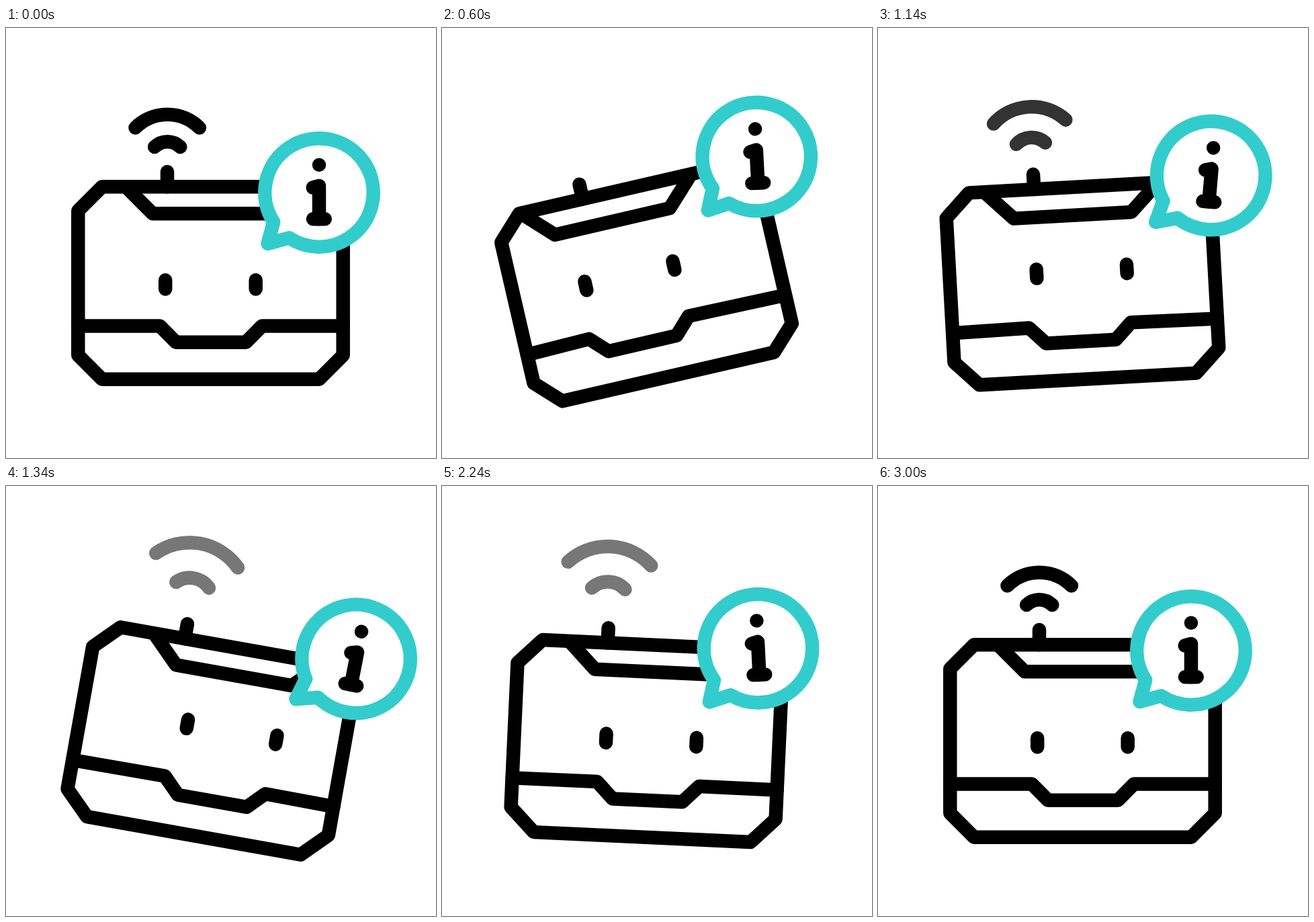
Write an HTML page with a canvas that moves like this. It is 640 by 640 pixels and loops after 3.02 s.

```html
<!DOCTYPE html>
<html lang="en">
<head>
<meta charset="utf-8">
<title>Device info</title>
<style>
  html, body { margin: 0; width: 100%; height: 100%; overflow: hidden; background: #fff; }
  canvas { display: block; width: 640px; height: 640px; }
</style>
</head>
<body>
<canvas id="stage" width="640" height="640"></canvas>
<script>
const ctx = document.getElementById('stage').getContext('2d');
const LOOP = 3020, STEP = 20;
const BEAT = 300, SWING = 3 * BEAT;
const TEAL = '#33cccc';
const RAD = Math.PI / 180;

const smooth = u => u * u * (3 - 2 * u);
const mix = (a, b, u) => a + (b - a) * u;

// Each swing moves for two beats and rests for one: rest, left, right, rest.
const swingEase = t => smooth(Math.min(1, t % SWING / (2 * BEAT)));

function swing(t, left, right) {
  const stops = [0, left, right, 0, 0];
  const n = Math.floor(t / SWING);
  return mix(stops[n], stops[n + 1], swingEase(t));
}

// Blends the values that a rule gives at the beats around t.
function onBeat(t, rule, ease) {
  const n = Math.floor(t / BEAT);
  return mix(rule(n), rule(n + 1), ease(t / BEAT - n));
}

const signalAlpha = n => n === 0 || n % 3 === 1 ? 1 : 0;
const bubbleTilt = n => n === 0 || n >= 8 ? 0 : n % 2 ? -10 : 10;

const shift = (pts, dx, dy) => pts.map(([x, y]) => [x + dx, y + dy]);
const mirror = pts => [...pts, ...pts.map(([x, y]) => [-x, y]).reverse()];

function line(pts, close = false) {
  ctx.beginPath();
  pts.forEach(p => ctx.lineTo(...p));
  if (close) ctx.closePath();
  ctx.stroke();
}

function drawSignal(t) {
  const k = t < 3 * SWING ? 1 + 0.36 * swingEase(t) : 1;
  const x = mix(-54.8, -64.3, k), y = mix(-130, -183.3, k);
  ctx.globalAlpha = onBeat(t, signalAlpha, u => u);
  for (const r of [67.5, 27]) {
    ctx.beginPath();
    ctx.arc(x, y, r * k, -135 * RAD, -45 * RAD);
    ctx.stroke();
  }
  ctx.globalAlpha = 1;
}

function drawBox(t) {
  const w = 197.2, h = 143.2, cut = 35.7;
  line(mirror([[cut - w, h], [-w, h - cut], [-w, cut - h], [cut - w, -h]]), true);
  line([[-64.5, -h], [-64.5, -165.5]]);

  const flap = mirror([[-127.4, -143], [-87.6, -103.2]]);
  line(shift(flap, 1.4 + swing(t, -30.5, 25.5), swing(t, 2.6, 0.5)));

  const mouth = mirror([[-76, 64], [-52, 88.3]]);
  line([[-w, 64], ...shift(mouth, 0.5 + swing(t, -26.6, 27), swing(t, -2, -0.5)), [w, 64]]);

  for (const x of [-67.3, 67.2]) {
    line(shift([[x, -4.3], [x, 9.1]], swing(t, -22, 39.6), swing(t, -18.6, -21.8)));
  }
}

// Coordinates are relative to the centre of the bubble.
function drawBubble(t) {
  const out = swing(t, 1, 1);
  const px = -69.6, py = 71;
  ctx.translate(161.5 + 29.1 * out + px, -134.5 - 25 * out + py);
  ctx.rotate(onBeat(t, bubbleTilt, smooth) * RAD);
  ctx.translate(-px, -py);

  ctx.beginPath();
  ctx.arc(0, 0, 80.7, 147.1 * RAD, 483.5 * RAD);
  ctx.lineTo(-76.5, 76);
  ctx.closePath();
  ctx.fillStyle = '#fff';
  ctx.fill();
  ctx.strokeStyle = TEAL;
  ctx.stroke();

  ctx.strokeStyle = '#000';
  line([[0, -41.3], [0, -41.3]]);
  line([[-9.3, -7.5], [0, -10], [0, 39.2]]);
  line([[-9, 39.2], [8.8, 39.2]]);
}

function draw(t) {
  ctx.setTransform(1, 0, 0, 1, 0, 0);
  ctx.fillStyle = '#fff';
  ctx.fillRect(0, 0, 640, 640);
  ctx.lineWidth = 20.5;
  ctx.lineCap = ctx.lineJoin = 'round';
  ctx.strokeStyle = '#000';
  ctx.translate(304.5, 379.5);
  ctx.rotate(swing(t, -13, 15) * RAD);
  drawSignal(t);
  drawBox(t);
  drawBubble(t);
}

function tick() {
  draw(Math.floor(performance.now() % LOOP / STEP) * STEP);
  requestAnimationFrame(tick);
}
tick();
</script>
</body>
</html>
```
